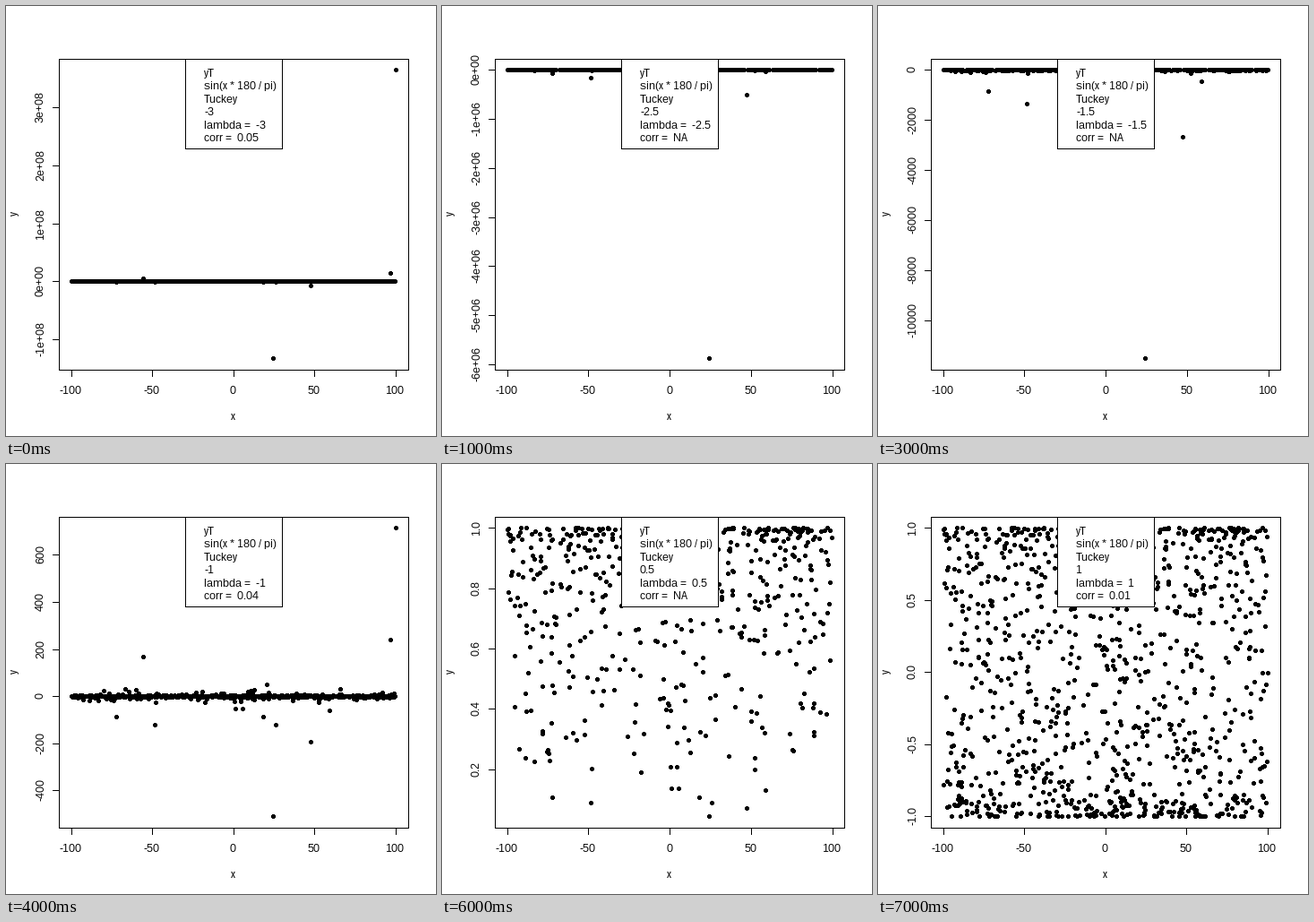
These frames come from a looping animation (480 px wide and 480 px high, 8 s). A matplotlib script:

```python
import numpy as np
import matplotlib.pyplot as plt
from matplotlib.animation import FuncAnimation
from matplotlib.patches import Rectangle

plt.rcParams.update({
    "font.family": "Liberation Sans",
    "font.size": 9,
    "text.hinting": "native",
    "text.hinting_factor": 1,
    "axes.unicode_minus": False,
})

LEFT, RIGHT, TOP, BOTTOM = 59, 449, 59, 406
PX = 0.75  # one pixel in points

# lambda, correlation, y tick step, y label format
STEPS = [
    (-3, "0.05", 1e8, ".0e"),
    (-2.5, "NA", 1e6, ".0e"),
    (-2, "-0.06", 1e5, ".0e"),
    (-1.5, "NA", 2000, ".0f"),
    (-1, "0.04", 200, ".0f"),
    (-0.5, "NA", 5, ".0f"),
    (0.5, "NA", 0.2, ".1f"),
    (1, "0.01", 0.5, ".1f"),
]

# The few values near zero become the outliers; the last two set the x range
KEY_X = [24.4, 47.4, -48.5, 25.9, -72.2, 18.2, 59, 1.1, 5.5,
         99.9, 96.5, -55.5, -99.8, 99.6]
KEY_Y = [.00196, .0052, .0082, .0082, .0113, .0113, .017, .0185, .0185,
         -.0014, -.00415, -.006, .99, .94]

# A pixel disc: a 5 x 5 square without its corners
QUARTER = np.array([(2.5, 1.5), (1.5, 1.5), (1.5, 2.5)])
DOT = np.vstack([QUARTER, QUARTER[::-1] * [-1, 1],
                 -QUARTER, QUARTER[::-1] * [1, -1], QUARTER[:1]])


def make_data():
    rng = np.random.default_rng(12)

    def cloud(n, smallest):
        x = rng.uniform(-99.7, 99.5, n)
        y = np.sin(rng.uniform(np.arcsin(smallest), np.pi / 2, n))
        return x, y

    x_up, y_up = cloud(489, .03)
    x_down, y_down = cloud(497, .011)
    return (np.concatenate([KEY_X, x_up, x_down]),
            np.concatenate([KEY_Y, y_up, -y_down]))


X, Y = make_data()


def transform(lam):
    keep = np.ones(len(Y), bool) if lam == int(lam) else Y > 0
    y = Y[keep] ** lam
    return X[keep], -y if lam < 0 else y


def make_scale(values, start, end):
    """Map data to pixels with 4% padding at both ends."""
    lo, hi = values.min(), values.max()
    pad = 0.04 * (hi - lo)
    lo, hi = lo - pad, hi + pad

    def to_px(v):
        return start + (np.asarray(v) - lo) / (hi - lo) * (end - start)

    return to_px, lo, hi


def ticks(lo, hi, step):
    return [int(k) * step for k in
            np.arange(np.ceil(lo / step), np.floor(hi / step) + 1)]


def pixel(v):
    """Pixel position kept clear of the renderer's rounding edge."""
    return np.floor(v) + .2


fig = plt.figure(figsize=(5, 5), dpi=96, facecolor="white")
ax = fig.add_axes([0, 0, 1, 1])


def line(xs, ys):
    ax.plot(pixel(xs), pixel(ys), color="black", lw=PX, antialiased=False,
            solid_capstyle="projecting", zorder=2)


def box(x0, y0, x1, y1, fill, z):
    ax.add_patch(Rectangle((pixel(x0), pixel(y0)), x1 - x0, y1 - y0, lw=PX,
                           edgecolor="black", facecolor=fill,
                           antialiased=False, zorder=z))


def label(x, y, s, ha="center", rotation=0):
    ax.text(x, y, s, ha=ha, va="baseline", rotation=rotation,
            rotation_mode="anchor", color="black", zorder=5)


def draw(i):
    lam, corr, step, fmt = STEPS[i]
    ax.clear()
    ax.set(xlim=(0, 480), ylim=(480, 0))
    ax.axis("off")

    x, y = transform(lam)
    sx, x_lo, x_hi = make_scale(x, 59.04, 449.76)
    sy, y_lo, y_hi = make_scale(y, 406.56, 59.04)

    ax.plot(pixel(sx(x)), pixel(sy(y)), ls="", marker=DOT, color="black",
            ms=5 * PX, mew=0, zorder=1)
    box(LEFT, TOP, RIGHT, BOTTOM, "none", 2)

    for v in ticks(x_lo, x_hi, 50):
        px = float(sx(v))
        line([px, px], [BOTTOM, BOTTOM + 7])
        label(px - 1, 433, f"{v}")
    for v in ticks(y_lo, y_hi, step):
        py = float(sy(v))
        line([LEFT - 7, LEFT], [py, py])
        label(42, py - 1, f"{v:{fmt}}", rotation=90)
    label(253, 462, "x")
    label(13, 231.5, "y", rotation=90)

    box(200, TOP, 308, 159, "white", 4)
    legend = ["yT", "sin(x * 180 / pi)", "Tuckey", f"{lam}",
              f"lambda =  {lam}", f"corr =  {corr}"]
    for row, s in enumerate(legend):
        label(221, round(79 + 14.4 * row), s, ha="left")
    return []


anim = FuncAnimation(fig, draw, frames=len(STEPS), interval=1000,
                     init_func=lambda: draw(0), repeat=True, repeat_delay=0)
plt.show()
```
